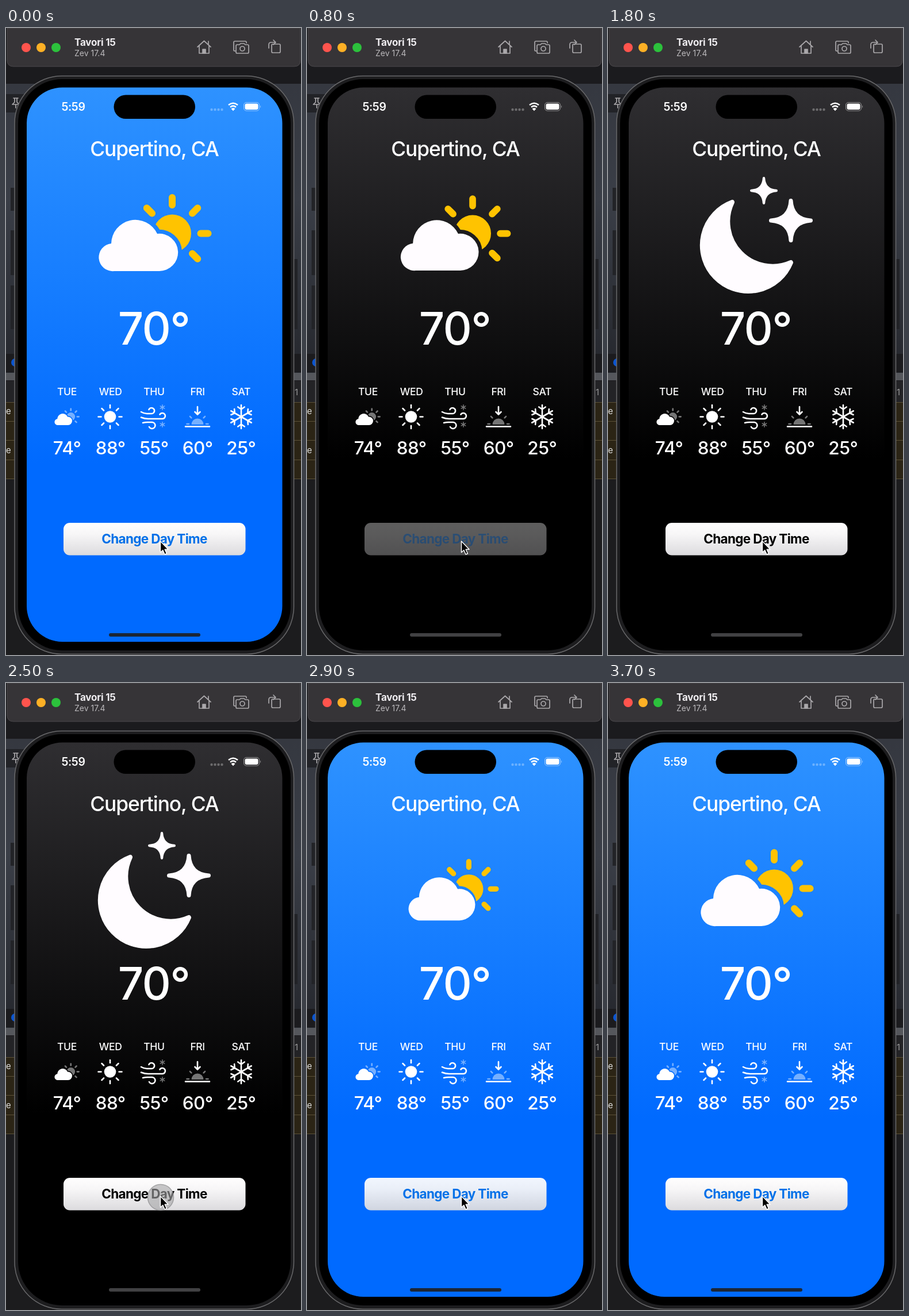
Write an HTML page that moves like this. It is 513x1091 px and loops after 3.8 s.

```html
<!DOCTYPE html>
<html lang="en">
<head>
<meta charset="utf-8">
<title>Weather</title>
<style>
html, body { margin: 0; width: 100%; height: 100%; overflow: hidden; background: #1b1b1e; }
svg { display: block; width: 100vw; height: 100vh; font-family: Inter, "Liberation Sans", sans-serif; }
.mid { text-anchor: middle; fill: #fff; font-weight: 500; letter-spacing: -.02em; }
.line { fill: none; stroke: #fff; stroke-width: 2.6; stroke-linecap: round; stroke-linejoin: round; }
.tool { fill: none; stroke: #aaa8ab; stroke-width: 1.7; stroke-linecap: round; stroke-linejoin: round; }
.dim { opacity: .45; }
</style>
</head>
<body>
<svg viewBox="0 0 513 1091">
  <defs>
    <linearGradient id="desk" x2="0" y2="1">
      <stop stop-color="#353840"/><stop offset=".4" stop-color="#3a3e47"/><stop offset="1" stop-color="#25272d"/>
    </linearGradient>
    <linearGradient id="dayFill" gradientUnits="userSpaceOnUse" x1="258" y1="104" x2="258" y2="760">
      <stop stop-color="#2e92ff"/><stop offset="1" stop-color="#006aff"/>
    </linearGradient>
    <linearGradient id="nightFill" gradientUnits="userSpaceOnUse" x1="258" y1="104" x2="258" y2="750">
      <stop stop-color="#2f2e31"/><stop offset="1" stop-color="#000"/>
    </linearGradient>
    <linearGradient id="buttonFill" x2="0" y2="1">
      <stop stop-color="#fffefe"/><stop offset=".35" stop-color="#f7f6f7"/><stop offset="1" stop-color="#dcdbde"/>
    </linearGradient>
    <path id="cloudShape" d="M188 423a24 24 0 0 1-5-48a42 42 0 0 1 80-17a32.6 32.6 0 1 1 3 65z"/>
    <mask id="gap" maskUnits="userSpaceOnUse" x="150" y="270" width="230" height="180">
      <path fill="#fff" d="M150 270h230v180h-230z"/>
      <use href="#cloudShape" stroke="#000" stroke-width="14"/>
    </mask>
    <g id="sunShape" mask="url(#gap)">
      <circle cx="289" cy="357.500" r="33" fill="currentColor"/>
      <path id="sunRays" stroke="currentColor" stroke-width="12" stroke-linecap="round"/>
    </g>
    <path id="star" d="M0-34.500Q2-2 34.500 0Q2 2 0 34.500Q-2 2-34.500 0Q-2-2 0-34.500Z" stroke-width="7"/>
  </defs>

  <!-- desktop behind the simulator -->
  <path fill="url(#desk)" d="M0 97h513v503H0z"/>
  <path fill="#1b1b1e" d="M0 67h513v30H0zM0 567h513v32H0z"/>
  <path fill="#222327" d="M0 115h40v32H0zM8 278h9v40H8zM8 352h9v78H8zM8 448h9v76H8zM499 402h8v122h-8z"/>
  <path fill="#55575c" d="M0 600h513v13H0z"/>
  <path fill="#232326" d="M0 614h513v37H0z"/>
  <path fill="#2b2415" d="M0 651h513v134H0z"/>
  <path stroke="#5b5137" d="M0 651.500h513M0 684.500h513M0 717.500h513M0 751.500h513M0 784.500h513"/>
  <path fill="#1c1c1e" d="M0 785h513v306H0z"/>
  <circle cx="16" cy="582" r="7" fill="#0b55d0"/>
  <path class="tool" d="M13 122h8M15 122v7l-4 4h12l-4-4v-7M17 133v6"/>
  <g fill="#dedede" font-size="15"><text y="672">e</text><text y="740">e</text><text x="502" y="639" fill="#999">1</text></g>

  <!-- simulator toolbar -->
  <path fill="#363437" stroke="#4b494c" d="M2 0h510v56q0 11-11 11H13Q2 67 2 56z"/>
  <circle cx="35" cy="34" r="8" fill="#ff544d"/><circle cx="61" cy="34" r="8" fill="#fdb025"/><circle cx="87" cy="34" r="8" fill="#2cc13c"/>
  <text x="119" y="31" font-size="17" font-weight="700" fill="#efedf0" letter-spacing="-.2">Tavori 15</text>
  <text x="119" y="49" font-size="14" fill="#bbb9bc">Zev 17.4</text>
  <g class="tool">
    <path d="M333 33l11.500-10.500L356 33M336 31v13h17V31M352 28v-5"/>
    <path fill="#aaa8ab" d="M342 37h5v7h-5z"/>
    <path d="M399 40h-1q-2 0-2-2V25q0-2 2-2h18q2 0 2 2v1"/>
    <path d="M402 29h4l2-2h6l2 2h4q2 0 2 2v11q0 2-2 2h-18q-2 0-2-2V31q0-2 2-2z"/>
    <circle cx="411" cy="36" r="4"/>
    <rect x="462" y="28" width="15" height="15" rx="2"/>
    <path d="M457 35v-6q0-4 4-4h7M465 21l4 4-4 4"/>
  </g>

  <!-- phone -->
  <rect x="15" y="83.500" width="485.500" height="1006" rx="82" fill="#1d1d1f" stroke="#69696b" stroke-width="1.500"/>
  <rect x="21" y="89" width="474" height="994" rx="77" fill="#000"/>
  <rect id="screen" x="36" y="103.500" width="444.500" height="964.500" rx="62"/>
  <rect x="187.500" y="116.500" width="141.500" height="41.500" rx="20.700"/>

  <text class="mid" x="117" y="144" font-size="19.500" style="font-weight:600">5:59</text>
  <g fill="#fff">
    <g opacity=".3"><circle cx="357.500" cy="142" r="2.200"/><circle cx="363.500" cy="142" r="2.200"/><circle cx="369.500" cy="142" r="2.200"/><circle cx="375.500" cy="142" r="2.200"/></g>
    <path d="M391.500 140.500q3.500-3 7 0l-3.500 3.800z"/>
    <path class="line" d="M387 134q8-6.500 16 0M390 137.700q5-4 10 0" style="stroke-linecap:butt"/>
    <rect x="413.500" y="129.500" width="27" height="14.500" rx="4.500" fill="none" stroke="#fff" opacity=".5"/>
    <rect x="415.500" y="131.500" width="23" height="10.500" rx="3"/>
    <path d="M442 134.500q2 2 0 5z" opacity=".5"/>
  </g>

  <text class="mid" x="258" y="223" font-size="35.300" style="letter-spacing:-.03em">Cupertino, CA</text>

  <g id="cloud" fill="#fffcff"><use href="#cloudShape"/></g>
  <g id="sun" color="#ffc300"><use href="#sunShape"/></g>
  <g id="moon" fill="#fffcff" stroke="#fffcff">
    <path stroke-width="8" stroke-linejoin="round" d="M216 303A78 78 0 0 0 318 408A80 80 0 1 1 216 303z"/>
  </g>
  <g id="stars" fill="#fffcff" stroke="#fffcff" stroke-linejoin="round">
    <use href="#star" transform="translate(318 335)"/>
    <use href="#star" transform="translate(271 283) scale(.63)"/>
  </g>

  <text class="mid" x="257" y="551" font-size="78">70°</text>
  <g id="days"></g>

  <g fill="#fff" color="#fff">
    <g transform="translate(48.600 597) scale(.222)"><use href="#cloudShape"/><use href="#sunShape" class="dim"/></g>
    <circle cx="181" cy="676.500" r="10.300"/>
    <path id="smallRays" class="line"/>
    <path class="line" d="M235 668q5 3 10 3h8a5 5 0 1 0-4.500-7M235 677.500q6 2.500 12 2.500h25a5 5 0 1 0-4.500-7.500M238 687q4-1 8-1h8a5.500 5.500 0 1 1-5 8"/>
    <path id="flakes" class="line dim" style="stroke-width:1.600"/>
    <path class="dim" d="M322.500 690a10.500 10.500 0 0 1 21 0z"/>
    <path id="duskRays" class="line dim"/>
    <path class="line" d="M333 659v13M328.500 668l4.500 4.500 4.500-4.500M312 693.500h42"/>
    <path id="snow" class="line"/>
  </g>

  <rect id="button" x="100" y="861" width="316.500" height="56.500" rx="11" fill="url(#buttonFill)"/>
  <text id="label" class="mid" x="258" y="897" font-size="22.500" style="font-weight:700;letter-spacing:-.03em">Change Day Time</text>
  <rect id="home" x="179" y="1053" width="159" height="6" rx="3"/>

  <circle id="touch" cx="269" cy="895" r="22.500" fill="#a5a5a7" fill-opacity=".6" stroke="#8a8a8c" stroke-opacity=".7" stroke-width="1.500"/>
  <path fill="#000" stroke="#fff" stroke-width="1.400" stroke-linejoin="round" d="M268.500 893v19.500l4.300-4 3.300 7.500 3.300-1.500-3.300-7.200h6z"/>
</svg>

<script>
const $ = id => document.getElementById(id);
const clamp = x => Math.min(1, Math.max(0, x));
const smooth = x => (x = clamp(x), x * x * (3 - 2 * x));
const LOOP = 3800, STEP = 100, NIGHT = 770, DAY = 2599;

// Radial strokes around a centre, angles in degrees
const rays = (x, y, from, to, angles) => angles.map(a => {
  const c = Math.cos(a * Math.PI / 180), s = Math.sin(a * Math.PI / 180);
  return `M${x + c * from} ${y + s * from}L${x + c * to} ${y + s * to}`;
}).join('');
const turn = (n, start = 0) => Array.from({length: n}, (_, i) => start + i * 360 / n);

$('sunRays').setAttribute('d', rays(289, 357.5, 49.5, 62.5, [-135, -90, -45, 0, 45]));
$('smallRays').setAttribute('d', rays(181, 676.5, 15.5, 20.5, turn(8)));
$('flakes').setAttribute('d', rays(272, 660, 0, 4.3, turn(6, 30)) + rays(272, 690, 0, 4.3, turn(6, 30)));
$('duskRays').setAttribute('d', rays(333, 689, 15, 18.5, [180, 225, 315, 0]));
$('snow').setAttribute('d', turn(6, 30).map(a => {
  const r = a * Math.PI / 180, x = 409 + 13 * Math.cos(r), y = 676.5 + 13 * Math.sin(r);
  return rays(409, 676.5, 0, 20.5, [a]) + rays(x, y, 0, 7, [a - 55, a + 55]);
}).join(''));

$('days').innerHTML = [['TUE', 74], ['WED', 88], ['THU', 55], ['FRI', 60], ['SAT', 25]].map(([day, temp], i) => {
  const x = 106 + i * 75.7;
  return `<text class="mid" x="${x}" y="638.500" font-size="17.500">${day}</text>
    <text class="mid" x="${x}" y="742" font-size="31.500">${temp}°</text>`;
}).join('');

function pose(id, scale, opacity) {
  $(id).setAttribute('transform', `translate(257 361) scale(${scale}) translate(-257 -361)`);
  $(id).setAttribute('opacity', opacity);
}
function leave(id, e) {
  const u = clamp(e / 170);
  pose(id, 1 - .5 * u * u, 1 - smooth((u - .4) / .6));
}
function enter(id, e) {
  const u = clamp((e - 195) / 160);
  pose(id, .4 + .6 * smooth(u), clamp(u * 2));
}

function draw(now) {
  const t = Math.floor(now % LOOP / STEP) * STEP;
  const night = t >= NIGHT && t < DAY;
  const e = night ? t - NIGHT : (t - DAY + LOOP) % LOOP;
  const [main, extra, oldMain, oldExtra] = night
    ? ['moon', 'stars', 'cloud', 'sun'] : ['cloud', 'sun', 'moon', 'stars'];
  leave(oldMain, e);
  leave(oldExtra, e + 12);
  enter(main, e);
  enter(extra, e - 15);

  $('screen').setAttribute('fill', `url(#${night ? 'nightFill' : 'dayFill'})`);
  $('home').setAttribute('fill', night ? '#414143' : '#1c2636');
  $('button').setAttribute('opacity', 1 - .83 * Math.exp(-e / 110));
  const mix = clamp(e / 75), blue = night ? 1 - mix : mix;
  $('label').style.fill = `rgb(0,${112 * blue},${232 * blue})`;
  $('label').setAttribute('opacity', 1 - .7 * Math.exp(-e / 80));
  const pressed = t === 700 || t === 2500;
  $('touch').setAttribute('opacity', pressed ? 1 : 0);
}

function tick() {
  draw(performance.now());
  requestAnimationFrame(tick);
}
tick();
</script>
</body>
</html>
```
